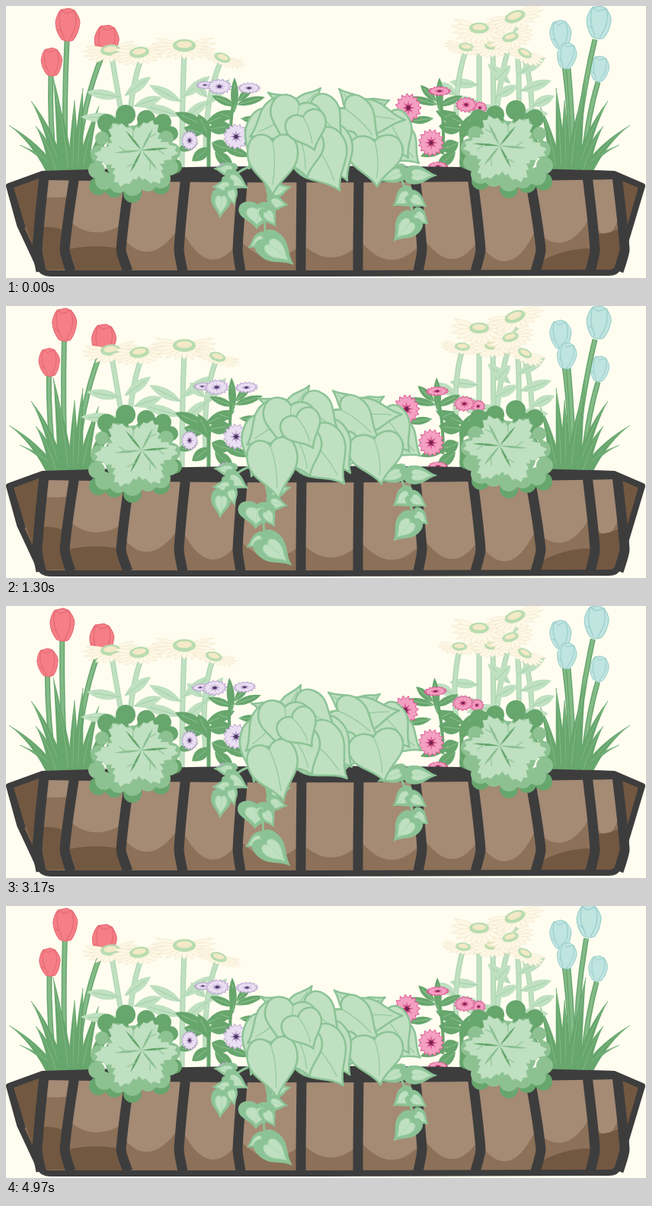
These frames come from a looping animation (840 px wide and 358 px high, 5.01 s). An HTML page:

```html
<!DOCTYPE html>
<html>
<head>
<meta charset="utf-8">
<title>Window box</title>
<style>
html, body { margin: 0; width: 100%; height: 100%; overflow: hidden; background: #fffdf0; }
svg { display: block; }
</style>
</head>
<body>
<svg id="stage" width="840" height="358" viewBox="0 0 840 358"></svg>
<script>
const DEEP = '#67a66d', MID = '#8cc396', PALE = '#bfe0c1', SOFT = '#addab2', IRON = '#3d3d3d';
const LIGHT = '#a58a74', BROWN = '#8c7058', DARK = '#735841';

const path = (d, fill, stroke = 'none', w = 1) =>
  `<path d="${d}" fill="${fill}" stroke="${stroke}" stroke-width="${w}" stroke-linejoin="round"/>`;
const line = (d, stroke, w) => path(d, 'none', stroke, w);
const oval = (x, y, rx, ry, fill, stroke = 'none', w = 1) =>
  `<ellipse cx="${x}" cy="${y}" rx="${rx}" ry="${ry}" fill="${fill}" stroke="${stroke}" stroke-width="${w}"/>`;
const place = (x, y, turn, body, sx = 1, sy = sx) =>
  `<g transform="translate(${x} ${y}) rotate(${turn}) scale(${sx} ${sy})">${body}</g>`;
const sway = (id, body) => `<g id="${id}">${body}</g>`;
const each = (list, draw) => list.map(a => draw(...a)).join('');

// Slender leaf between two points
function lens(x0, y0, x1, y1, w, fill, vein) {
  const len = Math.hypot(x1 - x0, y1 - y0);
  const nx = (y0 - y1) / len * w, ny = (x1 - x0) / len * w;
  const mx = (x0 + x1) / 2, my = (y0 + y1) / 2;
  return path(`M${x0} ${y0}Q${mx + nx} ${my + ny} ${x1} ${y1}Q${mx - nx} ${my - ny} ${x0} ${y0}Z`, fill) +
    (vein ? line(`M${x0} ${y0}L${x0 + (x1 - x0) * .8} ${y0 + (y1 - y0) * .8}`, vein, 1) : '');
}

// Heart-shaped leaf from its stalk to its tip
function heart(x0, y0, x1, y1, w, fill, edge, lw = 2) {
  const h = Math.hypot(x1 - x0, y1 - y0);
  const turn = Math.atan2(x0 - x1, y1 - y0) * 180 / Math.PI;
  const side = s => `C${s * w * .25} ${-h * .2} ${s * w} ${-h * .18} ${s * w} ${h * .22}`;
  const d = `M0 0${side(-1)}C${-w} ${h * .58} ${-w * .25} ${h * .68} 0 ${h}` +
    `C${w * .25} ${h * .68} ${w} ${h * .58} ${w} ${h * .22}C${w} ${-h * .18} ${w * .25} ${-h * .2} 0 0Z`;
  return place(x0, y0, turn, path(d, fill, edge, lw) +
    line(`M0 0Q${w * .15} ${h * .4} 0 ${h * .8}`, edge, 1));
}

const vineLeaf = (x0, y0, x1, y1, w) => {
  const mix = (a, b, k) => a + (b - a) * k;
  return heart(x0, y0, x1, y1, w, MID, MID, 1) +
    heart(mix(x0, x1, .2), mix(y0, y1, .2), mix(x0, x1, .82), mix(y0, y1, .82), w * .58, PALE, SOFT, 1);
};
const ivyLeaf = (...a) => heart(...a, PALE, MID, 2.5);

function star(x, y, rx, ry, n, inner, fill, edge) {
  const pts = [];
  for (let i = 0; i < n * 2; i++) {
    const a = i * Math.PI / n, k = i % 2 ? inner : 1;
    pts.push((x + rx * k * Math.cos(a)).toFixed(1) + ' ' + (y + ry * k * Math.sin(a)).toFixed(1));
  }
  return path(`M${pts.join('L')}Z`, fill, edge, 1);
}

function tulip(x, y, s, fill, edge, turn = 0) {
  return place(x, y, turn,
    path('M-9 -20L2 -22L9 -19Q16 -10 16 -3Q14 12 7 20Q0 23 -8 19Q-16 8 -16 -4Q-14 -15 -9 -20Z', fill, edge, 1) +
    line('M-9 -20Q-13 -4 -8 8L-4 18M9 -19Q13 -4 8 8L2 20M-9 -20L-2 -15L9 -19M-13 5L-8 8', edge, 1), s);
}
const red = (x, y, s, a) => tulip(x, y, s, '#f47f86', '#e3646f', a);
const blue = (x, y, s, a) => tulip(x, y, s, '#c0e4e0', '#90cac7', a);
const stalk = d => line(d, DEEP, 7) + line(d, '#83bb88', 4);

function grass() {
  const blades = [
    [62, 4, 157, 9], [70, 18, 183, 8], [72, 33, 125, 8], [66, 39, 158, 8], [76, 62, 94, 8], [82, 67, 122, 7],
    [88, 90, 124, 7], [94, 101, 108, 7], [100, 122, 132, 8], [104, 147, 158, 8], [110, 128, 160, 7]];
  return each(blades, (x, tx, ty, w) => {
    const cx = x + (tx - x) * .4, cy = 217 + (ty - 217) * .62;
    return path(`M${x - w} 219Q${cx - w * .6} ${cy} ${tx} ${ty}Q${cx + w * .7} ${cy} ${x + w} 219Z`, DEEP) +
      line(`M${x} 217Q${cx} ${cy} ${tx} ${ty}`, '#80b985', 1);
  });
}

// Drooping petals round a flat disc
function daisy(x, y, r, turn = 0, k = .55) {
  let petals = '';
  for (let i = 0; i < 13; i++) {
    const a = -25 + i * 19.2;
    const len = r * (2.2 + .6 * Math.abs(Math.cos(a * Math.PI / 180)));
    petals += `<g transform="scale(1 ${k}) rotate(${a})">` +
      path(`M${r * .6} -2Q${len * .7} -7 ${len} 0Q${len * .7} 6 ${r * .6} 2Z`, '#fff8e6', '#f1e8cd', .9) + '</g>';
  }
  return place(x, y, turn, petals + oval(0, 0, r, r * .56, '#b9dcb0') + oval(0, -r * .08, r * .68, r * .3, '#f3e9c6'));
}
const softStem = d => line(d, '#a9d3ae', 7) + line(d, PALE, 5);
const softLeaf = (x0, y0, x1, y1, w = 13) => lens(x0, y0, x1, y1, w, PALE, '#a2cfa9');

function bloom(x, y, rx, ry, fill, edge, core) {
  return star(x, y, rx, ry, 15, .78, fill, edge) + star(x, y, rx * .52, ry * .52, 8, .4, edge, 'none') +
    star(x, y, rx * .28, ry * .28, 6, .45, core, 'none');
}
const lilac = (x, y, rx, ry = rx) => bloom(x, y, rx, ry, '#eadff2', '#bca5d3', '#49345e');
const pink = (x, y, rx, ry = rx) => bloom(x, y, rx, ry, '#f4a0c2', '#dd5e96', '#7a204e');
const spike = (x0, y0, x1, y1, w = 10) => lens(x0, y0, x1, y1, w, DEEP, '#8cc093');

const topSpikes = each([
  [300, 140, 300, 94], [302, 130, 340, 120], [302, 132, 270, 118], [304, 126, 325, 104],
  [308, 148, 340, 152], [298, 148, 278, 140]], spike) + line('M296 195Q292 150 302 108', DEEP, 4);
const lowSpikes = each([
  [262, 158, 222, 140, 15], [262, 155, 300, 138, 15], [258, 168, 234, 160, 16], [265, 162, 296, 158, 18],
  [268, 176, 252, 142, 15], [270, 180, 292, 190, 18], [268, 186, 244, 204, 15], [274, 192, 298, 212, 15],
  [284, 185, 320, 198, 12], [288, 176, 322, 180, 12], [252, 180, 226, 190, 12]], spike) + line('M266 215V160', DEEP, 5);

function ruffled() {
  const rim = [[132, 154, 12], [157, 143, 13], [184, 149, 12], [206, 153, 11], [216, 168, 10], [145, 165, 18],
    [190, 168, 22], [221, 211, 10], [203, 236, 12], [166, 247, 12], [142, 240, 12], [121, 237, 12], [170, 200, 40]];
  const frill = [[126, 174, 9], [123, 195, 12], [119, 216, 11], [129, 230, 12], [148, 233, 13], [166, 237, 13],
    [186, 232, 12], [203, 227, 13], [215, 212, 11], [217, 192, 12], [210, 174, 10], [145, 163, 9],
    [183, 164, 10], [170, 198, 41]];
  let lamina = [], veins = '';
  for (let i = 0; i < 64; i++) {
    const a = i * Math.PI / 32;
    const r = 41 * (1 + .17 * Math.cos(6 * a + .5) - (i % 2) * .11);
    lamina.push((171 + r * 1.17 * Math.cos(a)).toFixed(1) + ' ' + (194 + r * Math.sin(a)).toFixed(1));
  }
  for (let i = 0; i < 6; i++) {
    const a = i * Math.PI / 3 + .95, x = 178 + 36 * Math.cos(a), y = 190 + 32 * Math.sin(a);
    veins += lens(178, 190, x, y, 3, i % 2 ? DEEP : '#8abf91') +
      line(`M${178 + 20 * Math.cos(a)} ${190 + 18 * Math.sin(a)}l${12 * Math.cos(a + .7)} ${12 * Math.sin(a + .7)}`, '#98c99e', 1.4);
  }
  return each(rim, (x, y, r) => oval(x, y, r, r, DEEP)) +
    each(frill, (x, y, r) => oval(x, y, r, r, '#8dc192')) + path(`M${lamina.join('L')}Z`, PALE) + veins;
}

function planter() {
  const bars = [[50, 41, 46], [90, 77, 85], [163, 151, 160], [236, 227, 232], [311, 304, 308], [388, 387, 387],
    [463, 462, 462], [537, 546, 541], [612, 623, 616], [687, 702, 695], [763, 773, 767], [802, 812, 804]];
  const cups = [[250, 252, 250], [282, 298, 286], [304, 323, 288], [292, 333, 311], [306, 331, 314],
    [311, 331, 315], [306, 334, 312], [300, 333, 306], [314, 335, 290], [300, 310, 275], [285, 300, 270]];
  const at = (b, y) => b[0] + (b[1] - b[0]) * (y - 226) / 92;
  const panels = cups.map(([l, m, r], i) => {
    const a = bars[i], b = bars[i + 1];
    return path(`M${a[0]} 226L${at(a, l)} ${l}Q${(a[1] + b[1]) / 2} ${2 * m - (l + r) / 2} ${at(b, r)} ${r}L${b[0]} 226Z`, LIGHT);
  }).join('');
  const shade = path('M8 238L50 225L41 318L46 347ZM42 292Q60 288 78 296L86 347H44ZM78 321Q115 312 153 320L160 348H84Z' +
    'M700 337Q735 318 773 319L767 348H696ZM773 300Q795 300 811 290L803 348H768ZM802 225L832 238L803 347L812 300Z', DARK);
  const outline = 'M4 237L48 221Q420 208 798 221L835 237L803 344Q801 351 791 351L420 352L60 352Q48 353 44 344L18 288Z';
  return path(outline, BROWN) + panels + shade +
    path('M46 218Q420 206 800 218L800 228Q420 236 48 229Z', IRON) +
    each(bars, (a, b, c) => line(`M${a} 224Q${(a + b * 3) / 4} 285 ${b} 320Q${b} 326 ${c} 349`, IRON, 13)) +
    line(outline, IRON, 8) + line('M8 239L24 292M832 239L816 296', IRON, 4);
}

const mirror = (x, y, body) => `<g transform="translate(${x} ${y}) scale(-1 1)">${body}</g>`;

stage.innerHTML =
  sway('reds', stalk('M80 46Q76 130 78 216') + stalk('M126 66Q100 130 92 216') + stalk('M59 90Q57 150 64 216') +
    red(81, 25, 1) + red(132, 47, 1, 4) + red(60, 74, .86, -3)) +
  stalk('M730 56Q742 140 742 216') + stalk('M738 82Q744 150 745 216') + blue(728, 38, .88, -4) + blue(736, 66, .8, 8) +
  sway('blueLow', stalk('M777 100Q762 150 757 216') + blue(779, 83, .78, 6)) +
  sway('blueTall', stalk('M773 44Q752 130 748 216') + blue(778, 22, 1, 3)) +
  grass() + mirror(823, 0, grass()) +

  softStem('M138 62L153 150') + softStem('M178 68Q166 100 162 150') + softStem('M234 58Q231 130 231 216') +
  each([[150, 120, 106, 113], [150, 148, 98, 146], [156, 118, 190, 93], [168, 132, 205, 120], [230, 126, 188, 104],
    [230, 145, 178, 130], [232, 120, 268, 92], [232, 150, 266, 124]], softLeaf) +
  daisy(137, 58, 13, -6) + daisy(175, 61, 13, -8) + daisy(234, 52, 15, 0) +
  sway('daisyLeft', softStem('M281 75Q262 120 262 190') +
    each([[264, 130, 294, 96], [264, 120, 246, 100]], softLeaf) + daisy(284, 68, 11, 20, .4)) +

  softStem('M621 38V160') + softStem('M668 22Q676 90 672 160') + softStem('M662 48Q648 90 642 160') +
  softStem('M639 58L640 150') + softStem('M681 70Q692 110 690 160') +
  each([[672, 90, 708, 68], [675, 112, 716, 98], [662, 102, 632, 76], [690, 132, 720, 118], [620, 104, 582, 100],
    [620, 125, 577, 124], [643, 98, 662, 78], [645, 132, 604, 140], [672, 140, 712, 142], [642, 120, 672, 104]], softLeaf) +
  sway('daisyRight', softStem('M603 60Q590 100 591 150') + softLeaf(592, 118, 568, 100) + daisy(604, 54, 10, 8, .45)) +
  daisy(681, 62, 10, 28) + daisy(638, 52, 10, 0, .7) + daisy(662, 41, 11, -15, .65) +
  daisy(621, 29, 13, 0, .75) + daisy(668, 14, 14, -20) +

  lowSpikes + mirror(864, 0, lowSpikes) +
  sway('lilacs', topSpikes + lilac(261, 104, 11, 5) + lilac(280, 106, 16, 10) + lilac(319, 108, 15, 7) + lilac(344, 140, 13, 9)) +
  lilac(241, 177, 11, 13) + lilac(302, 172, 17) + lilac(290, 212, 12, 6) +
  sway('pinks', mirror(869, 0, topSpikes) + pink(569, 112, 15, 6) + pink(622, 134, 9, 8) + pink(604, 130, 14, 10) + pink(528, 134, 17, 19)) +
  pink(558, 180, 17, 18) + pink(617, 185, 12, 9) + pink(567, 211, 13, 6) +

  planter() + ruffled() + mirror(826, -6, ruffled()) +

  line('M318 212Q290 224 282 250', MID, 3) +
  each([[300, 216, 273, 214, 9], [290, 224, 318, 240, 11], [296, 237, 271, 238, 9], [283, 246, 281, 279, 13], [294, 240, 300, 262, 8]], vineLeaf) +
  sway('vine', line('M338 228Q350 255 340 280Q338 296 345 315', MID, 3) +
    each([[346, 245, 374, 238, 10], [345, 258, 370, 262, 10], [330, 262, 329, 293, 24], [340, 268, 354, 290, 10],
      [340, 304, 318, 318, 9], [339, 308, 377, 340, 19]], vineLeaf)) +
  line('M512 208Q524 240 530 262Q538 276 530 290', MID, 3) +
  each([[522, 217, 488, 231, 11], [528, 222, 565, 223, 12], [532, 246, 508, 263, 13], [530, 250, 552, 264, 10],
    [536, 272, 554, 287, 10], [535, 280, 509, 309, 17]], vineLeaf) +

  sway('ivyRight', each([[466, 140, 437, 109, 13], [470, 138, 503, 124, 12], [505, 170, 542, 207, 25], [455, 150, 424, 198, 30],
    [500, 150, 528, 200, 26], [455, 145, 524, 150, 24], [445, 135, 490, 178, 27], [462, 176, 440, 212, 22],
    [484, 178, 487, 238, 36]], ivyLeaf)) +
  sway('ivyLeft', each([[385, 140, 344, 114, 13], [384, 140, 413, 108, 14], [420, 170, 448, 230, 28], [400, 135, 442, 176, 30],
    [350, 150, 319, 214, 28], [375, 140, 320, 172, 28], [385, 130, 365, 185, 34], [402, 178, 438, 243, 38],
    [385, 172, 395, 226, 30], [350, 178, 350, 249, 33], [390, 146, 405, 190, 27]], ivyLeaf));

// Swing at full lean: angle and pivot
const leaning = {
  reds: [-2.4, 80, 218], daisyLeft: [-6, 260, 190], daisyRight: [-6, 592, 150], lilacs: [-5, 300, 185],
  pinks: [-4.5, 570, 190], vine: [2.8, 340, 235], ivyLeft: [-18, 385, 200], ivyRight: [-12.5, 455, 184]
};
const late = { blueTall: [-3.8, 748, 215], blueLow: [-.9, 757, 215] };

function pose(set, k) {
  for (const id in set) {
    const [angle, x, y] = set[id];
    document.getElementById(id).setAttribute('transform', `rotate(${angle * k} ${x} ${y})`);
  }
}

const TURN = 2.63;
function frame(now) {
  const t = now % 5010 / 1000;
  pose(leaning, t < TURN ? t * .388 : 1.02 - (t - TURN) * .27);
  pose(late, Math.max(0, t - TURN) / 2.34);
  requestAnimationFrame(frame);
}
requestAnimationFrame(frame);
</script>
</body>
</html>
```
